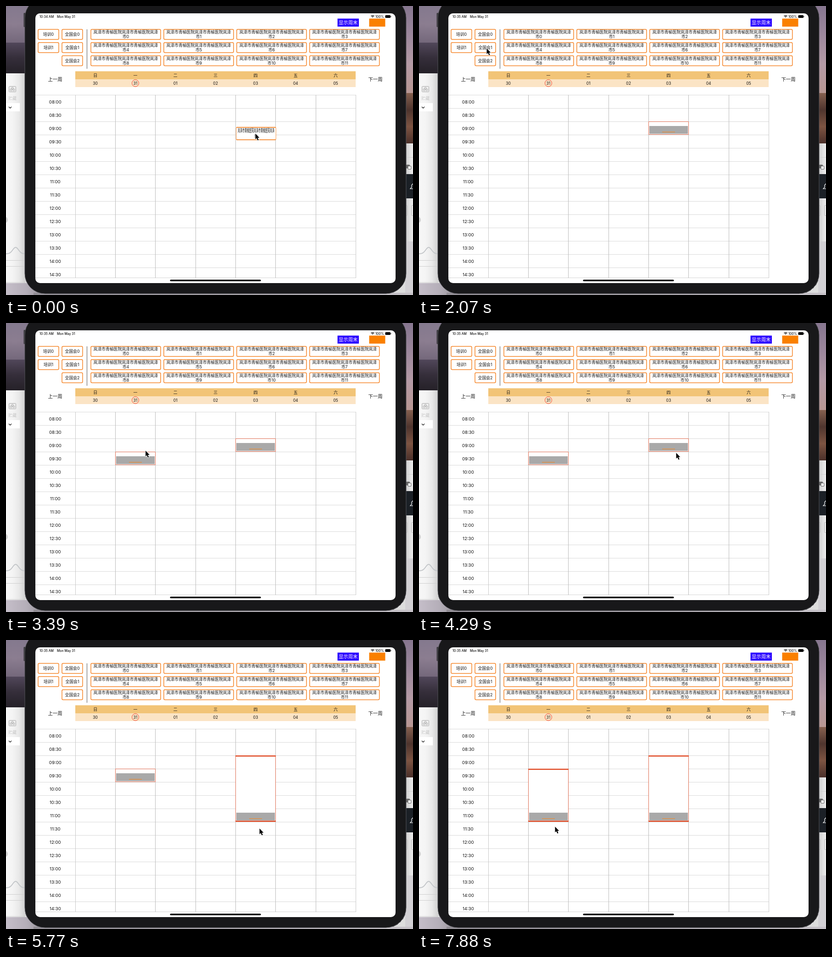
An HTML page with a canvas that plays this animation: 887 by 631 pixels, repeating every 8000 ms.

```html
<!DOCTYPE html>
<html lang="zh-CN">
<head>
<meta charset="utf-8">
<title>Week planner</title>
<style>
html, body { margin: 0; width: 100%; height: 100%; overflow: hidden; background: #ddd; }
canvas { display: block; width: 887px; height: 631px; }
</style>
</head>
<body>
<canvas id="stage" width="887" height="631"></canvas>
<script>
const ctx = document.getElementById('stage').getContext('2d');
const LOOP = 8000, TICK = 148;
const FONT = 'Inter, "Noto Sans CJK SC", "Noto Sans CJK", sans-serif';
const ORANGE = '#f5862a', RED = '#e04a25';
const COL = 87.3, ROW = 29, GRID_X = 151, GRID_Y = 194;
const CITY = '岚泽市', CLINIC = CITY + '青榆医院';

const DROP_A = 1, NEW_MINUTE = 14, LIFT_B = 15, DROP_B = 22;
const STRETCH_A = { from: 34, to: 39 }, STRETCH_B = { from: 49, to: 53 };
const HOME = { x: 543, y: 278 };
const MOVES = [
  { from: 1, to: 7, x: 356, y: 104 },
  { from: 7, to: 8, x: 185, y: 107 },
  { from: 8, to: 10, x: 147, y: 92 },
  { from: 14, to: 19, x: 256, y: 328 },
  { from: 19, to: 21, x: 283, y: 307 },
  { from: 21, to: 25, x: 415, y: 123 },
  { from: 25, to: 29, x: 560, y: 283 },
  { from: 29, to: 31, x: 552, y: 276 },
  { ...STRETCH_A, x: 552, y: 411 },
  { from: 40, to: 45, x: 272, y: 302 },
  { ...STRETCH_B, x: 296, y: 407 }
];

const tickAt = t => Math.floor((t + 10) / TICK);
const progress = (n, { from, to }) => Math.min(1, Math.max(0, (n - from) / (to - from)));
const ease = u => u * u * (3 - 2 * u);
const lerp = (a, b, u) => a + (b - a) * u;

function cursorAt(n) {
  return MOVES.reduce((p, m) => {
    const u = ease(progress(n, m));
    return { x: lerp(p.x, m.x, u), y: lerp(p.y, m.y, u) };
  }, HOME);
}

function rect(x, y, w, h, color) {
  ctx.fillStyle = color;
  ctx.fillRect(x, y, w, h);
}

function paint(fill, stroke, lw = 1) {
  if (fill) { ctx.fillStyle = fill; ctx.fill(); }
  if (stroke) { ctx.strokeStyle = stroke; ctx.lineWidth = lw; ctx.stroke(); }
}

function round(x, y, w, h, r, ...style) {
  ctx.beginPath();
  ctx.roundRect(x, y, w, h, r);
  paint(...style);
}

function arc(x, y, r, from, to, ...style) {
  ctx.beginPath();
  ctx.arc(x, y, r, from, to);
  paint(...style);
}

function path(points, ...style) {
  ctx.beginPath();
  points.forEach(p => ctx.lineTo(...p));
  paint(...style);
}

function label(s, x, y, size, color = '#111', align = 'center', weight = 400) {
  ctx.font = `${weight} ${size}px ${FONT}`;
  ctx.textAlign = align;
  ctx.fillStyle = color;
  ctx.fillText(s, x, y + size * 0.37);
}

function fade(x, y, w, h, across, ...colors) {
  const g = ctx.createLinearGradient(x, y, across ? x + w : x, across ? y : y + h);
  colors.forEach((c, i) => g.addColorStop(i / (colors.length - 1), c));
  rect(x, y, w, h, g);
}

function leftSide() {
  fade(0, 0, 60, 80, false, '#84798e', '#8b7d90', '#74687b');
  fade(0, 80, 60, 67, false, '#51475a', '#352e3a', '#252128');
  fade(0, 147, 42, 458, true, '#f7f7f7', '#f4f4f4', '#e9e9e9', '#cfcfcf');
  rect(0, 212, 30, 18, '#fff');
  round(6.5, 175.5, 15, 12, 1, '#ededed', '#aaa');
  for (let i = -1; i < 2; i++) arc(14 + i * 3, i ? 183 : 179.5, 2, 0, 7, null, '#aaa');
  label('贮藏', 14, 202, 9, '#c4c4c4');
  path([[6, 220], [9, 223], [12, 220]], null, '#222', 1.3);
  arc(-3, 467, 7, 0, 7, '#d2d2d2');
  const wave = Array.from({ length: 43 }, (_, x) =>
    [x, 541 - 14 * Math.exp(-(((x - 21) / 9) ** 2))]);
  path(wave, null, '#c3c6c9', 2);
  for (const y of [555, 568, 603]) rect(0, y, 42, 1, '#cecece');
  fade(0, 605, 90, 26, true, '#c5bec9', '#b4aeb8', '#918d94');
}

function rightSide() {
  fade(840, 0, 47, 190, false, '#86768f', '#9c879c', '#b49aa5', '#b89793');
  fade(840, 190, 47, 110, false, '#85604f', '#4f352e', '#7d5442', '#4b302a');
  fade(870, 300, 17, 331, true, '#cccccc', '#ececec');
  rect(870, 330, 17, 1, '#cfcfcf');
  round(872, 346.5, 8, 8, 1, '#666');
  round(876, 349.5, 7, 7, 1, '#eee', '#666');
  rect(868, 367, 19, 53, '#1b2026');
  path([[887, 388], [884, 391], [884, 396], [881, 399], [887, 399]], null, '#fff', 1.2);
  round(860, 435.5, 14.5, 22, 1, null, '#bbb');
  round(883.5, 435.5, 14.5, 22, 1, null, '#bbb');
  rect(870, 514, 17, 117, '#d2d0d4');
  fade(60, 626, 827, 5, true, '#918d94', '#a5a1a7', '#c7c3c9');
}

function tablet() {
  round(38.5, 15, 4, 31, 1.5, '#3a393d');
  round(41, -18, 831, 646, 44, '#18181a', '#55555a');
  round(64, 16, 785, 589, 10, '#fff');
  round(357.5, 597.4, 198, 3.5, 1.7, '#000');
}

function status(n) {
  label(n < NEW_MINUTE ? '10:34 AM' : '10:35 AM', 73, 23, 6.9, '#111', 'left', 500);
  label('Mon May 31', 111, 23, 6.9, '#111', 'left', 500);
  for (let r = 1; r < 6; r += 2) {
    arc(799, 25.5, r, -Math.PI * 0.75, -Math.PI * 0.25, null, '#000', 1.2);
  }
  label('100%', 805, 23, 6.9, '#111', 'left', 500);
  round(826.5, 20, 11.5, 6, 1.6, '#000');
  rect(838.6, 22, 1, 2, '#333');
}

// A button centred on x, y with one or two lines of text
function button(x, y, w, lines) {
  round(x - w / 2, y - 11, w, 22, 2.5, '#fff', ORANGE, 1.5);
  lines.forEach((s, i) => label(s, x, y + (lines.length > 1 ? i * 10 - 5 : 0), 8.8));
}

const clinicLines = i => [CLINIC + CLINIC + CITY.slice(0, 2), CITY[2] + i];

function toolbar() {
  rect(722.5, 27.5, 46.5, 17.5, '#2a00ff');
  label('显示周末', 745.7, 36, 10.4, '#fff');
  rect(791.5, 27.5, 35, 17.5, '#fa8000');
  for (let i = 0; i < 3; i++) {
    const y = 62 + i * 28.8;
    if (i < 2) button(92.5, y, 45, ['培训' + i]);
    button(144.5, y, 45, ['全国会' + i]);
    for (let j = 0; j < 4; j++) button(261 + j * 158.9, y, 152, clinicLines(i * 4 + j));
  }
  rect(176, 51, 1, 86, '#555');
}

const colX = i => Math.floor(GRID_X + i * COL + 0.2);

function calendar() {
  rect(151, 142.5, 611, 17.5, '#f2c477');
  rect(151, 160, 611, 17, '#fbe4c5');
  label('上一周', 107, 160, 10.4);
  label('下一周', 805, 160, 10.4);
  for (let i = 0; i < 7; i++) {
    const x = GRID_X + COL * (i + 0.5);
    const day = new Date(2021, 4, 30 + i).getDate();
    label('日一二三四五六'[i], x, 151.5, 8.8);
    label(String(day).padStart(2, '0'), x, 168.5, 8.6);
  }
  arc(282, 168.5, 7.5, 0, 7, null, '#f0402c');

  for (let i = 0; i < 14; i++) {
    const y = GRID_Y + i * ROW;
    rect(64, y, 698, 1, '#d9d9d9');
    const hour = String(8 + (i >> 1)).padStart(2, '0');
    label(hour + (i % 2 ? ':30' : ':00'), 107.3, y + 15, 9.6);
  }
  rect(64, 593, 698, 1, '#d4d4d4');
  for (let i = 0; i < 8; i++) rect(colX(i), GRID_Y, 1, 400, i % 7 ? '#bcbcbc' : '#c8c8c8');
}

// A booking starts one row tall and is stretched down to half past eleven
function booking(n, col, row, stretch) {
  const x = colX(col), top = GRID_Y + row * ROW;
  const u = ease(progress(n, stretch)), edge = u > 0;
  const bottom = lerp(top + ROW, GRID_Y + 7 * ROW, u);
  const base = bottom - (edge ? 3 : 2);
  rect(x, top, 88, bottom - top, '#fff');
  round(x + 0.5, top + 0.5, 87, bottom - top - 1, 0, null, '#dc6b50');
  rect(x + 2, base - 17, 84, 17, '#a9a9a9');
  rect(x + 30, base - 4.5, 28, 1.2, '#f08a2c');
  if (edge) {
    rect(x, top, 88, 2.5, RED);
    rect(x, bottom - 2.5, 88, 2.5, RED);
  }
}

// A lifted button takes the size of one calendar cell
function lifted(x, y, w, lines) {
  ctx.save();
  ctx.translate(x, y);
  ctx.scale(COL / (w + 1.5), ROW / 23.5);
  button(0, 0, w, lines);
  ctx.restore();
}

function pointer({ x, y }) {
  ctx.save();
  ctx.translate(x, y);
  ctx.lineJoin = 'round';
  ctx.beginPath();
  [[0.5, 0.5], [0.5, 13], [3.3, 10.5], [5.5, 15.5], [7.7, 14.6], [5.5, 9.7], [9.3, 9.7]]
    .forEach(p => ctx.lineTo(...p));
  ctx.closePath();
  paint(null, '#fff', 1.8);
  paint('#000');
  ctx.restore();
}

function draw(t) {
  const n = tickAt(t), c = cursorAt(n);
  leftSide();
  rightSide();
  tablet();
  status(n);
  toolbar();
  calendar();
  if (n >= DROP_A) booking(n, 4, 2, STRETCH_A);
  else lifted(545, 278.5, 152, clinicLines(0));
  if (n >= DROP_B) booking(n, 1, 3, STRETCH_B);
  else if (n >= LIFT_B) lifted(c.x - 8.5, c.y - 1.5, 45, ['全国会1']);
  pointer(c);
}

const began = performance.now();
function frame() {
  draw((performance.now() - began) % LOOP);
  requestAnimationFrame(frame);
}
frame();
</script>
</body>
</html>
```
